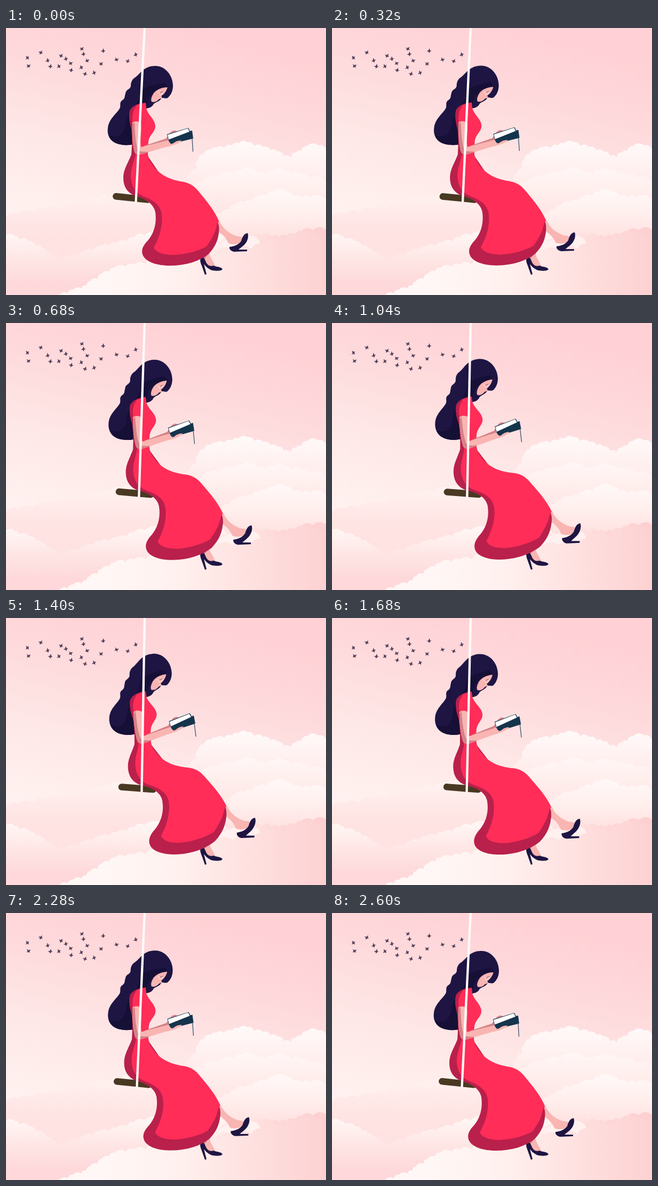
Animation, 600 px wide and 500 px high, one loop 2.64 s. Source, as an HTML page:

```html
<!DOCTYPE html>
<html lang="en">
<head>
<meta charset="utf-8">
<title>Reading on a swing</title>
<style>
  html, body { margin: 0; width: 100%; height: 100%; overflow: hidden; }
  svg { display: block; width: 100vw; height: 100vh; }
</style>
</head>
<body>
<svg id="stage" viewBox="0 0 600 500" preserveAspectRatio="none"></svg>
<script>
const PERIOD = 2640;
const stage = document.getElementById('stage');

function add(tag, attrs, parent = stage) {
  const el = document.createElementNS('http://www.w3.org/2000/svg', tag);
  for (const key in attrs) el.setAttribute(key, attrs[key]);
  parent.append(el);
  return el;
}

let gradientCount = 0;
function gradient([x1, y1, x2, y2], ...colors) {
  const id = 'g' + gradientCount++;
  const el = add('linearGradient', { id, x1, y1, x2, y2, gradientUnits: 'userSpaceOnUse' });
  colors.forEach((color, i) =>
    add('stop', { offset: i / (colors.length - 1), 'stop-color': color }, el));
  return `url(#${id})`;
}

// Scalloped top edge through the given points, closed along a base line.
function cloud(points, fill, base = 500) {
  let d = `M${points[0]}`;
  for (let i = 1; i < points.length; i++) {
    const [a, b] = [points[i - 1], points[i]];
    const r = Math.hypot(b[0] - a[0], b[1] - a[1]) * .68;
    d += `A${r} ${r} 0 0 1 ${b}`;
  }
  add('path', { d: `${d}V${base}H${points[0][0]}Z`, fill });
}

// Sky and clouds
add('rect', { width: 600, height: 500,
  fill: gradient([370, 0, 270, 400], '#ffd0d5', '#fedadc', '#fee8e7', '#fff1ef') });

cloud([[0, 354], [24, 348], [50, 346], [76, 338], [100, 339], [126, 329], [150, 326],
  [172, 318], [194, 317], [214, 309], [240, 310], [270, 316], [310, 330], [350, 345]],
  gradient([0, 305, 0, 390], '#fff3f1', '#ffe9e8', '#fee3e2'));

cloud([[340, 288], [347, 272], [358, 263], [361, 246], [371, 236], [385, 228], [394, 224],
  [409, 225], [424, 220], [436, 216], [453, 214], [465, 221], [482, 223], [496, 229],
  [508, 231], [521, 240], [534, 242], [544, 233], [554, 230], [565, 221], [585, 220], [600, 228]],
  gradient([0, 210, 0, 310], '#fffafa', '#fff1f0', '#ffe7e6'));

cloud([[335, 306], [350, 294], [367, 290], [380, 280], [397, 279], [411, 272], [427, 273],
  [440, 266], [460, 264], [473, 272], [488, 274], [502, 267], [521, 267], [535, 274],
  [553, 274], [570, 281], [600, 288]],
  gradient([0, 262, 0, 350], '#fff7f6', '#ffeeec', '#ffe5e4'));

cloud([[390, 360], [405, 345], [419, 340], [430, 331], [447, 326], [461, 324], [472, 316],
  [488, 314], [500, 307], [526, 307], [539, 315], [555, 318], [571, 317], [600, 322]],
  gradient([0, 305, 0, 400], '#fff8f7', '#ffeeec', '#fee0df'));

cloud([[0, 388], [17, 390], [25, 396], [44, 400], [56, 408], [68, 412], [76, 420],
  [88, 426], [98, 435], [110, 433], [120, 427], [135, 427], [146, 419], [163, 416],
  [177, 409], [194, 408], [208, 402], [226, 400], [240, 392], [260, 388], [300, 390], [420, 400]],
  gradient([0, 386, 0, 480], '#fff6f4', '#fee6e5', '#fed8da'));

cloud([[400, 402], [425, 397], [448, 388], [462, 389], [480, 389], [498, 390], [512, 392],
  [526, 389], [543, 387], [554, 380], [575, 379], [600, 378]],
  gradient([420, 0, 600, 0], '#ffe9e7', '#fed8d8', '#fdcfd0'));

add('path', { d: 'M400,405C415,394 430,392 442,393C452,385 473,389 476,401C474,410 463,413 458,415C445,425 410,422 395,430Z', fill: '#fff1f0' });

cloud([[100, 500], [116, 497], [126, 490], [141, 488], [151, 482], [158, 474], [172, 470],
  [180, 460], [193, 456], [204, 449], [224, 447], [240, 443], [262, 443], [285, 434],
  [320, 428], [360, 424], [395, 418], [425, 416], [460, 414], [480, 405], [520, 400], [600, 397]],
  gradient([190, 0, 600, 0], '#fff7f5', '#fff0ee', '#fee0df', '#fdd1d2'));

// Birds
const birds = [[40, 56], [65, 46], [78, 61], [42, 71], [83, 72], [99, 72], [103, 52],
  [112, 58], [121, 66], [122, 79], [141, 74], [142, 39], [145, 49], [152, 61], [148, 86],
  [165, 84], [178, 67], [182, 43], [207, 59], [228, 62], [243, 50]];
birds.forEach(([x, y], i) => add('path', {
  d: 'M-4.5,-1L-1,-1.2L2,-4.5L2.2,-.5L4.5,1L1.8,1.5L-1,4L-1.5,1Z',
  fill: '#55415a',
  transform: `translate(${x} ${y}) rotate(${i * 67 % 110 - 55})`
}));

// Figure
const navy = '#1e1543', shade = '#160f36', red = '#ff2d57', wine = '#b9204b';
const skin = '#f9b5b2', blush = '#d58287', cover = '#173750';
const moving = [];
function part(d, fill, extra = {}) {
  moving.push([add('path', { d, fill, ...extra }), d]);
}
const line = (d, stroke, width) =>
  part(d, 'none', { stroke, 'stroke-width': width, 'stroke-linecap': 'round' });

// Hair and face
part('M280,71C299,71 313,89 313,108C313,119 308,127 303,131C299,133 295,130 292,131C288,138 282,138 277,142C273,150 266,150 262,151L246,215C236,220 224,220 214,218C196,215 189,202 191,187C193,170 207,161 213,151C216,145 212,141 217,136C224,132 222,128 224,123C225,114 232,116 234,109C234,102 236,96 243,92C252,85 259,71 280,71Z', navy);
part('M303,109C282,114 265,121 262,151L246,215C236,220 224,220 214,218C203,216 196,210 193,201C215,208 222,196 225,178C229,152 250,145 253,122C256,107 280,108 297,102Z', shade);
part('M303,111C295,111 283,114 277,122C273,128 271,134 273,138C278,140 284,137 287,133C291,132 293,132 293,129L291,127C298,125 303,118 303,111Z', skin);
part('M292,130C297,132 303,131 308,125C312,119 313,111 312,105L303,109C302,117 297,123 292,127Z', navy);
line('M285,120L289,121C287,125 289,127 292,125L296,119', '#fff3f1', 1);
line('M289,121L295,119', '#40334e', .7);

const seat = add('line', { stroke: '#4a3922', 'stroke-width': 12.5, 'stroke-linecap': 'round' });

// Planted leg
add('path', { d: 'M369,422L379,408L383,428C387,436 391,441 392,446L380,447L371,433Z', fill: skin });
add('path', { d: 'M369,420L379,408L379,423L372,433Z', fill: blush });
add('path', { d: 'M366,430C369,427 372,431 374,436C377,445 383,447 389,445C397,448 404,447 406,452C402,456 390,455 384,453C378,450 374,446 371,442L376,461L373,462L367,445C364,438 363,433 366,430Z', fill: navy });

// Crossed leg
part('M390,360L400,361C405,373 415,383 430,389C436,391 441,390 443,392L443,399C436,406 424,406 417,403C414,395 408,387 392,377Z', skin);
part('M453,384C455,389 454,396 450,402C446,408 440,411 436,415L452,415L452,418L428,419C421,418 418,413 419,410C428,409 436,406 441,399C443,392 446,385 453,384Z', navy);

// Dress
part('M262,140C249,140 235,146 232,155C230,168 232,178 235,190C237,207 236,222 235,237C229,253 220,264 220,281C220,298 228,308 241,314C262,320 277,329 280,345C283,367 277,385 266,398C256,408 252,418 258,428C265,439 285,445 307,445C337,445 362,437 379,424C393,410 399,395 399,379L392,350L300,290L266,240Z', wine);
part('M262,140L263,151C268,165 280,172 280,184C280,195 268,200 267,214C265,228 264,240 272,252C285,274 306,284 332,288C347,291 355,298 362,307C376,324 391,342 399,361C394,381 386,395 376,409C362,417 338,424 315,425C295,425 281,420 277,411C290,388 294,367 292,349C290,332 277,323 260,316C243,310 234,296 234,276C234,260 242,247 243,234L237,178C235,164 237,151 246,144Z', red);
part('M243,178L237,178C236,163 238,153 245,146C237,147 231,154 231,164C231,174 233,182 236,190Z', wine);
part('M393,378C395,371 396,367 397,364C401,370 400,386 396,394C392,404 385,416 378,424L373,417C385,407 390,393 393,378Z', wine);

// Arms and book
part('M258,221L300,207L309,195C312,192 319,192 321,194L314,212L257,231Z', blush);
part('M310,195C313,191 319,191 321,195L312,199Z', '#d9828c');
part('M237,177C243,173 249,175 253,178C255,192 251,207 253,223L301,211L325,207C331,208 331,213 326,214C317,218 308,222 299,223L255,236C249,238 243,237 241,232C237,218 236,197 237,177Z', skin);
part('M237,180C236,200 238,221 241,233C244,238 250,237 255,236L268,232L250,231C243,225 242,198 241,176Z', blush);
part('M302,199L342,187L345,193L349,192L351,207L310,217C307,216 304,211 302,199Z', cover);
part('M303,200L341,188L344,194L305,209Z', '#fff');
part('M306,209L348,194L350,206L312,216Z', '#15344c');
line('M349,206L350.5,231', '#395369', 1.3);
part('M312,217C318,212 324,210 329,211C326,215 318,218 309,221Z', skin);

const rope = add('line', { x1: 260, y1: -2, stroke: '#fffafa', 'stroke-width': 4.3 });

// Bends a point of the figure by its share of the swing.
function bend(x, y, swing) {
  const dx = Math.min((y - 145) * .065, 14) - Math.max(y - 415, 0) * .1;
  const lift = Math.min(Math.max((x - 225) * .075, 0), 10);
  const fade = 1 - Math.max(y - 395, 0) / 80;
  return [x + dx * swing, y - lift * fade * swing].map(n => n.toFixed(2)).join();
}

function set(el, attrs) {
  for (const key in attrs) el.setAttribute(key, attrs[key]);
}

function draw() {
  const swing = (1 - Math.cos(performance.now() / PERIOD * 2 * Math.PI)) / 2;
  for (const [el, d] of moving) {
    el.setAttribute('d', d.replace(/([\d.]+),([\d.]+)/g, (_, x, y) => bend(+x, +y, swing)));
  }
  set(seat, { x1: 206.3 + 10.7 * swing, y1: 315.3 + 1.3 * swing, x2: 266 + 10 * swing, y2: 321.5 - .5 * swing });
  set(rope, { x2: 243.5 + 11 * swing, y2: 326 });
  requestAnimationFrame(draw);
}
draw();
</script>
</body>
</html>
```
